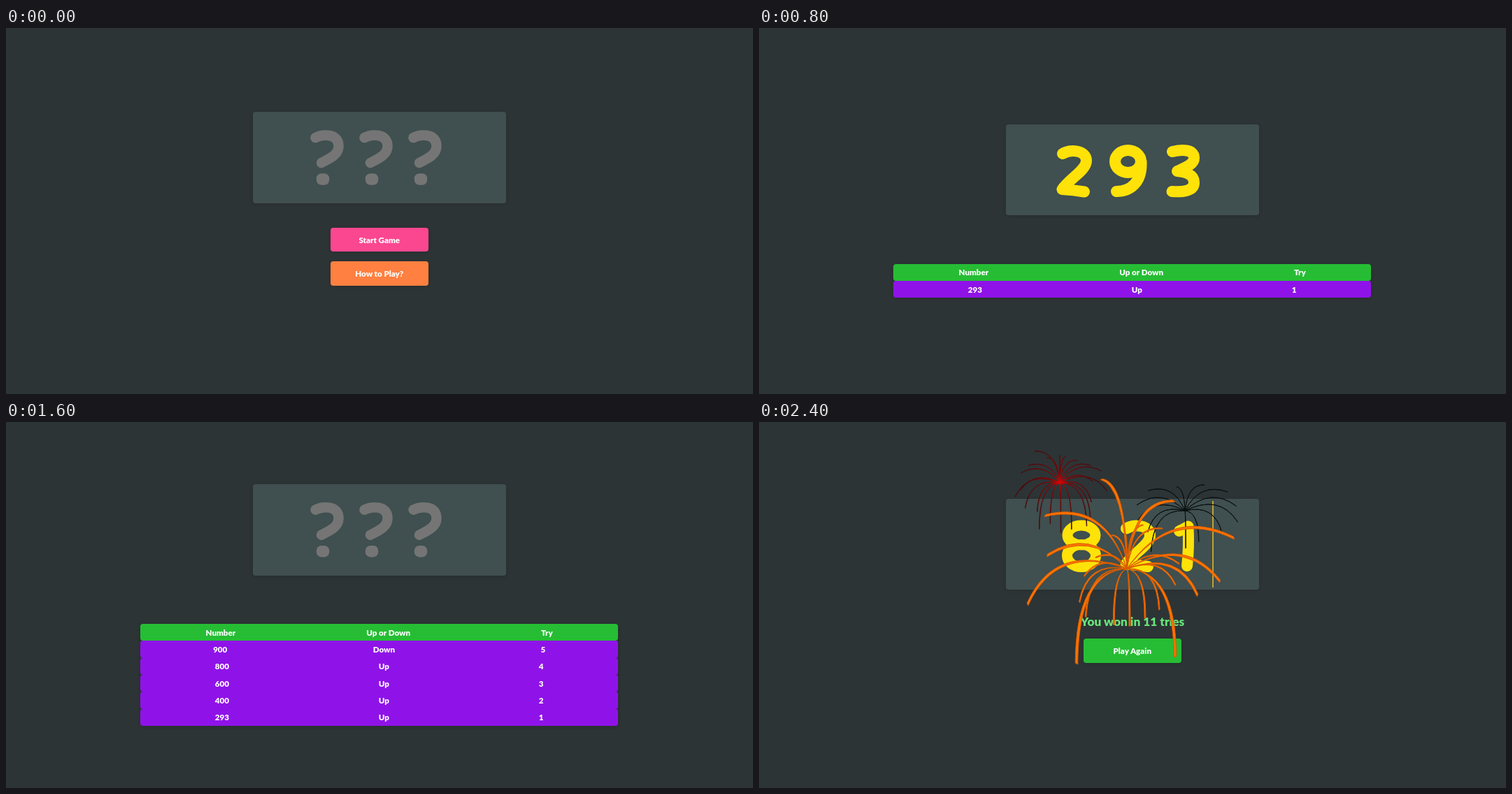
Animation, 1068 px wide and 524 px high, one loop 3.2 s. Source, as an HTML page:

```html
<!DOCTYPE html>
<html lang="en">
<head>
<meta charset="utf-8">
<title>Number guessing game</title>
<style>
  html, body { margin: 0; width: 100%; height: 100%; overflow: hidden; background: #2d3436; }
  body { font: 900 11.6px Lato, "Open Sans", sans-serif; color: #fff; }
  .scene, .scene > * { position: absolute; }
  .box { border-radius: 4px; box-shadow: 0 1px 5px rgba(0, 0, 0, .14); }
  .row, .button, .title { display: flex; align-items: center; justify-content: space-around; }
  .row { height: 24.35px; border-radius: 4px; }
  svg { left: 0; top: 0; }
</style>
</head>
<body>
<script>
const STEP = 800;
const GREEN = '#26bd34', PURPLE = '#8f13e8', YELLOW = '#ffe208', GREY = '#757575', SOOT = '#0c1011';

const box = (kind, x, y, w, h, fill, content = '') =>
  `<div class="${kind}" style="left:${x}px;top:${y}px;width:${w}px;height:${h}px;background:${fill}">${content}</div>`;
const panel = y => box('box', 352.5, y, 362.5, 130.5, '#404f4f');
const button = (s, y, fill) => box('box button', 464, y, 139.5, 34.7, fill, s);
const svg = content => `<svg width="1068" height="524">${content}</svg>`;

const row = (fill, ...cells) =>
  `<div class="row" style="background:${fill}">${cells.map(c => `<span>${c}</span>`).join('')}</div>`;
// Newest guess first; every guess but a final overshoot says "Up"
const table = (y, guesses) => box('box', 192, y, 683.3, 24.35 * (guesses.length + 1), 'none',
  row(GREEN, 'Number', 'Up or Down', 'Try') +
  guesses.map((n, i) => row(PURPLE, n, n > 821 ? 'Down' : 'Up', guesses.length - i)).join(''));

// Large characters drawn with a round brush
const oval = (x, y, rx, ry) =>
  `M${x - rx} ${y}a${rx} ${ry} 0 1 1 ${2 * rx} 0a${rx} ${ry} 0 1 1 ${-2 * rx} 0z`;
const glyph = (d, dx = 0, dy = 0, color = YELLOW, width = 16) =>
  `<path d="${d}" transform="translate(${dx} ${dy})" fill="none" stroke="${color}"
    stroke-width="${width}" stroke-linecap="round" stroke-linejoin="round"/>`;
const query = 'M442.5 157C452 152 475.5 150 475.5 169C475.5 182 462 187 451 193M451 215.5h4v2h-4z';
const two = 'M434 180C446 173 468 175 468 190C468 204 443 216 433.5 231Q450 232 465 234.5';
const nine = oval(527.5, 191, 18.5, 16) + 'M546.5 191C548 222 530 234 511 234';
const three = 'M591 177C604 174 622 173 622 186C622 196 608 200 598 205' +
  'C610 206 622 210 622 221C622 234 605 235 590.5 234';
const eight = oval(461, 162, 20, 14) + oval(461, 191.5, 20.5, 16);
const one = 'M601 156Q608 153 613.5 149.5Q615 180 612 206';
const queries = dy => svg([0, 70, 140].map(dx => glyph(query, dx, dy, GREY, 14.5)).join(''));

let seed = 7;
const random = () => (seed = seed * 16807 % 2147483647) / 2147483647;

// Offsets of n tips spread around an ellipse that has sunk by `drop`
const ring = (n, rx, ry, drop) => Array.from({ length: n }, (_, i) => {
  const angle = (i + random() * .6) / n * 2 * Math.PI, r = .6 + .4 * random();
  return [r * rx * Math.cos(angle), r * ry * Math.sin(angle) + drop];
});

// Trails leave the centre thin, arc upwards and fall to a wider tip
function burst(cx, cy, tips, width, fill, edge = fill) {
  const trails = tips.map(([dx, dy]) => {
    const len = Math.hypot(dx, dy), nx = -dy / len * width / 2, ny = dx / len * width / 2;
    const qx = dx * (.55 + dy / len / 2), qy = dy / 2 - .42 * len;
    return `M0 0Q${qx + nx} ${qy + ny} ${dx + nx} ${dy + ny}L${dx - nx} ${dy - ny}Q${qx - nx} ${qy - ny} 0 0`;
  });
  return `<path d="${trails.join('')}" transform="translate(${cx} ${cy})" fill="${fill}"
    stroke="${edge}" stroke-linejoin="round"/>`;
}

const ember = `<radialGradient id="ember" gradientUnits="userSpaceOnUse" cx="0" cy="0" r="50">
  <stop stop-color="#e00000"/><stop offset=".3" stop-color="#780808"/><stop offset="1" stop-color="#4a0d0f"/>
  </radialGradient>`;
const longTips = [[-36, -128], [67, -97], [153, -44], [133, 18], [101, 38],
  [69, 126], [-72, 136], [-142, 51], [-114, -19], [-117, -76]];
const fireworks = ember +
  burst(430, 87, ring(22, 70, 70, 12), .6, 'url(#ember)') +
  burst(609, 127, ring(13, 95, 62, 8), .3, SOOT) +
  burst(526, 210, ring(14, 80, 95, 12), 2, '#ff7300', '#d85c00') +
  burst(526, 210, longTips, 4, '#ff7300', '#d85c00');

const title = `<div class="title" style="left:434px;top:274px;width:200px;height:23px;
  font-size:17.3px;color:#67e679">You won in 11 tries</div>`;

const scenes = [
  panel(120) + queries(0) + button('Start Game', 285.7, '#fb4790') + button('How to Play?', 334.2, '#ff8040'),
  panel(137.5) + svg(glyph(two) + glyph(nine) + glyph(three)) + table(337.7, [293]),
  panel(89) + queries(-31.3) + table(289, [900, 800, 600, 400, 293]),
  panel(109.7) + title + button('Play Again', 310, GREEN) +
    svg(glyph(eight, 0, 0, YELLOW, 15) + glyph(two, 91, -27.5) + glyph(one) +
      '<path d="M649 113V237" stroke="#eabf25" stroke-width="1.5"/>' + fireworks)
];

document.body.insertAdjacentHTML('beforeend', scenes.map(s => `<div class="scene">${s}</div>`).join(''));
const groups = [...document.querySelectorAll('.scene')];

function draw(time) {
  const current = Math.floor(time / STEP) % groups.length;
  groups.forEach((g, i) => { g.style.display = i === current ? '' : 'none'; });
}

let start;
function tick(now) {
  start ??= now;
  draw(now - start);
  requestAnimationFrame(tick);
}
draw(0);
requestAnimationFrame(tick);
</script>
</body>
</html>
```
